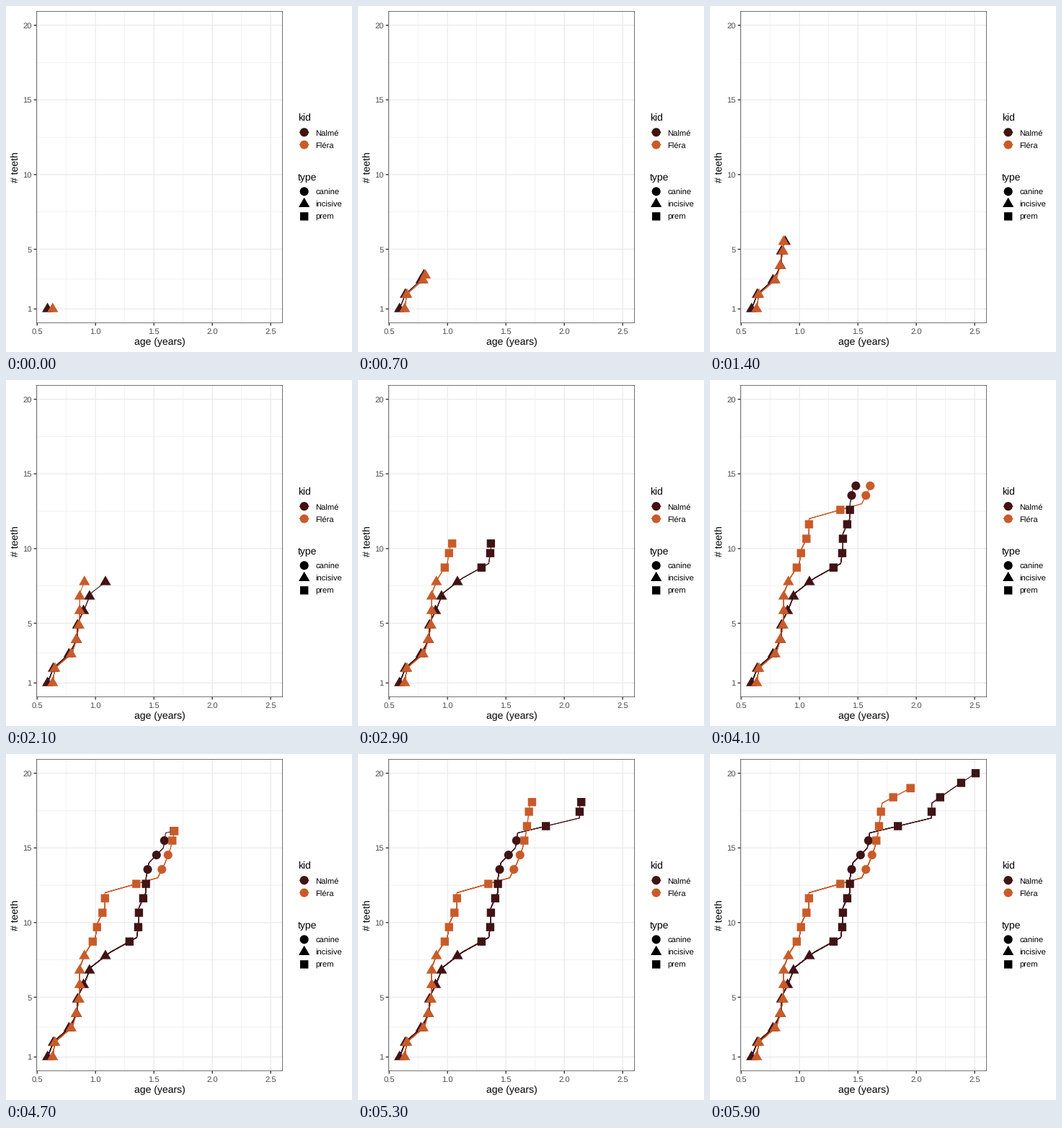
Recreate the animation shown at these times as a matplotlib script. Size 480 by 480 pixels, loop 6 s.

```python
import matplotlib.pyplot as plt
from matplotlib.animation import FuncAnimation
from matplotlib.patches import Circle, Polygon, Rectangle
import numpy as np

SIZE, DPI = 480, 72          # at 72 dpi one point is one pixel
FRAMES, STEP = 60, 3         # every third frame leaves a mark behind
LEFT, RIGHT, TOP, BOTTOM = 42.1, 384, 7, 440
CIRCLE, TRIANGLE, SQUARE = 16, 17, 15
HALF = 5.69                  # half the width of a square marker
THICK, THIN, PATH = 1.36, 0.68, 1.07
GRID, FRAME, TICK_TEXT = "#ebebeb", "#333333", "#4d4d4d"

plt.rcParams.update({
    "font.family": "Liberation Sans",
    "text.hinting": "none",
    "path.snap": False,
})

# name, colour, age at each new tooth, number of canines after the twelfth
KIDS = [
    ("Nalmé", "#401315",
     [0.589, 0.640, 0.782, 0.843, 0.846, 0.908, 0.959, 1.124, 1.353, 1.371,
      1.372, 1.430, 1.433, 1.457, 1.581, 1.600, 2.130, 2.133, 2.316, 2.508], 4),
    ("Fléra", "#c95b2a",
     [0.633, 0.652, 0.801, 0.838, 0.862, 0.865, 0.865, 0.917, 0.998, 1.019,
      1.080, 1.082, 1.533, 1.596, 1.643, 1.673, 1.690, 1.707, 1.951], 3),
]


def px(age):
    return 43.2 + 162 * (np.asarray(age) - 0.5)


def py(teeth):
    unit = (BOTTOM - TOP) / 20.9
    return BOTTOM - unit * (np.asarray(teeth) - 0.05)


fig = plt.figure(figsize=(SIZE / DPI, SIZE / DPI), dpi=DPI, facecolor="white")
ax = fig.add_axes([0, 0, 1, 1])
ax.set_xlim(0, SIZE)
ax.set_ylim(SIZE, 0)
ax.axis("off")


def line(x, y, color, width, z=1):
    return ax.plot(x, y, color=color, lw=width, zorder=z,
                   solid_capstyle="butt", solid_joinstyle="round")[0]


def label(x, y, text, size=11.2, color="black", ha="left", **kw):
    ax.text(x, y, text, size=size, color=color, ha=ha, va="baseline", **kw)


def marker(x, y, shape, color, z=4):
    if shape == CIRCLE:
        patch = Circle((x, y), HALF + 0.35)
    elif shape == SQUARE:
        patch = Rectangle((x - HALF, y - HALF), 2 * HALF, 2 * HALF)
    else:
        w, up, down = 1.3433 * HALF, 1.5512 * HALF, 0.7756 * HALF
        patch = Polygon([(x, y - up), (x + w, y + down), (x - w, y + down)])
    patch.set(facecolor=color, linewidth=0, zorder=z)
    return ax.add_patch(patch)


def draw_axes():
    for age in (0.75, 1.25, 1.75, 2.25):
        line([px(age)] * 2, [TOP, BOTTOM], GRID, THIN)
    for n in (3, 7.5, 12.5, 17.5):
        line([LEFT, RIGHT], [py(n)] * 2, GRID, THIN)
    for age in (0.5, 1.0, 1.5, 2.0, 2.5):
        x = px(age)
        line([x, x], [TOP, BOTTOM], GRID, THICK)
        line([x, x], [BOTTOM, BOTTOM + 3.5], FRAME, THICK)
        label(x, BOTTOM + 14.6, f"{age:.1f}", color=TICK_TEXT, ha="center")
    for n in (1, 5, 10, 15, 20):
        y = py(n)
        line([LEFT, RIGHT], [y, y], GRID, THICK)
        line([LEFT - 3.5, LEFT], [y, y], FRAME, THICK)
        label(LEFT - 6.3, y + 4, str(n), color=TICK_TEXT, ha="right")
    inset = THIN / 2
    ax.add_patch(Rectangle(
        (LEFT + inset, TOP + inset), RIGHT - LEFT - THIN, BOTTOM - TOP - THIN,
        fill=False, edgecolor=FRAME, lw=THIN, zorder=5))
    label((LEFT + RIGHT) / 2, 470.3, "age (years)", 14, ha="center")
    ax.text(17, (TOP + BOTTOM) / 2, "# teeth", size=14, rotation=90,
            rotation_mode="anchor", ha="center", va="baseline")


def draw_legend():
    x, text_x, gap = 413.7, 429.3, 17.28
    label(405, 159, "kid", 14)
    for k, (name, color, _, _) in enumerate(KIDS):
        y = 175.2 + k * gap
        line([x - 6.9, x + 6.9], [y, y], color, PATH)
        marker(x, y, CIRCLE, color)
        label(text_x, y + 4.2, name)
    label(405, 241.2, "type", 14)
    types = (("canine", CIRCLE), ("incisive", TRIANGLE), ("prem", SQUARE))
    for k, (name, shape) in enumerate(types):
        y = 257.3 + k * gap
        marker(x, y, shape, "black")
        label(text_x, y + 4.2, name)


def build_state(i):
    """Artists of both kids at the tooth count reached in frame i."""
    artists = []
    for _, color, ages, canines in KIDS:
        count = np.arange(1, len(ages) + 1)
        shapes = ([TRIANGLE] * 8 + [SQUARE] * 4 + [CIRCLE] * canines
                  + [SQUARE] * (len(ages) - 12 - canines))
        now = min(1 + 19 * i / (FRAMES - 1), len(ages))
        age = np.interp(now, count, ages)
        # shape codes blend like numbers, then truncate
        shape = int(np.interp(now, count, shapes) + 1e-9)
        done = count < now
        xs = px(np.append(np.array(ages)[done], age))
        ys = py(np.append(count[done], now))
        artists.append(line(xs, ys, color, PATH, 3))
        artists.append(marker(xs[-1], ys[-1], shape, color))
    return artists


draw_axes()
draw_legend()
states = [build_state(i) for i in range(FRAMES)]


def update(i):
    for j, artists in enumerate(states):
        shown = j == i or (j < i and j % STEP == 0)
        for artist in artists:
            artist.set_visible(shown)
    return []


anim = FuncAnimation(fig, update, frames=FRAMES, init_func=lambda: update(0),
                     interval=100, repeat=True, repeat_delay=0, blit=False)
plt.show()
```
